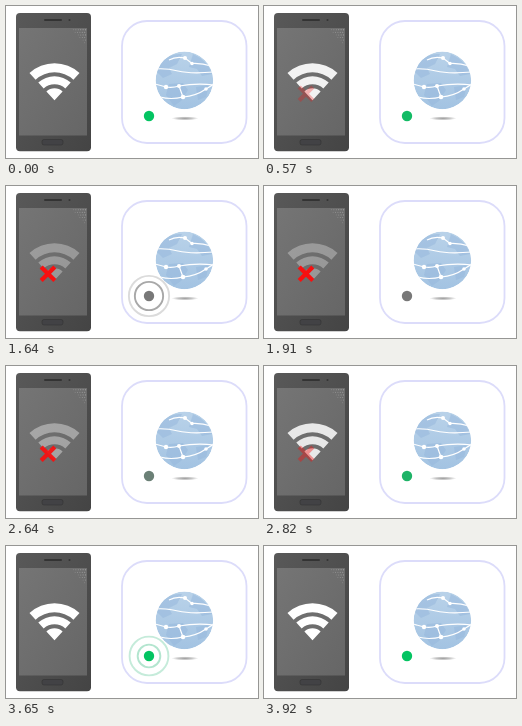
Write an HTML page that moves like this. It is 252 by 152 pixels and loops after 4520 ms.

```html
<!DOCTYPE html>
<html lang="en">
<head>
<meta charset="utf-8">
<title>Connection status</title>
<style>
html, body { margin: 0; width: 100%; height: 100%; overflow: hidden; background: #fff; }
svg { display: block; width: 100%; height: 100%; }
</style>
</head>
<body>
<svg viewBox="0 0 252 152">
  <defs>
    <linearGradient id="body" x2="1" y2="1">
      <stop offset="0" stop-color="#595959"/>
      <stop offset="1" stop-color="#444"/>
    </linearGradient>
    <linearGradient id="screen" x2="1" y2="1">
      <stop offset="0" stop-color="#757575"/>
      <stop offset="1" stop-color="#666"/>
    </linearGradient>
    <linearGradient id="sea" x2="0" y2="1">
      <stop offset="0" stop-color="#b9d2e9"/>
      <stop offset="1" stop-color="#a3c3e2"/>
    </linearGradient>
    <radialGradient id="shade">
      <stop offset="0" stop-color="#a0a0a0"/>
      <stop offset=".5" stop-color="#c4c4c4"/>
      <stop offset="1" stop-color="#fff"/>
    </radialGradient>
    <clipPath id="ball"><circle cx="178.4" cy="74.4" r="28.8"/></clipPath>
  </defs>

  <rect x="10" y="7" width="75" height="138.3" rx="4" fill="url(#body)"/>
  <rect x="13" y="22" width="68" height="107.5" fill="url(#screen)"/>
  <rect x="38" y="13" width="18" height="2" rx="1" fill="#333"/>
  <circle cx="63.5" cy="14" r="1" fill="#333"/>
  <rect x="36" y="133.5" width="21" height="5.5" rx="2" fill="#424245" stroke="#333" stroke-width=".6"/>
  <g id="dots" fill="#999"></g>
  <g id="wifi" fill="#fff"></g>
  <path id="cross" d="M35.2 80.9L48.8 94.5M48.8 80.9L35.2 94.5" fill="none" stroke="#f81010" stroke-width="4.3"/>

  <rect x="116" y="15" width="124.5" height="122" rx="25" fill="#fff" stroke="#dcdcfa" stroke-width="1.8"/>
  <ellipse cx="179" cy="112.4" rx="13.5" ry="2" fill="url(#shade)"/>
  <g clip-path="url(#ball)">
    <circle cx="178.4" cy="74.4" r="28.8" fill="url(#sea)"/>
    <g fill="#97b9dc" opacity=".55">
      <path d="M155 56Q164 47 176 48L171 58 163 62 166 68 157 72 151 66Z"/>
      <path d="M187 48Q201 54 206 68L196 70 191 63 183 61Z"/>
      <path d="M163 78L177 77 182 84 175 95 168 100 160 89Z"/>
      <path d="M190 81L203 79 200 91 192 94Z"/>
    </g>
    <g fill="none" stroke="#fff" stroke-width="1.2">
      <path d="M163 54Q170 50 179 52L186 57.5Q196 57 205 60"/>
      <path d="M149 63Q160 62 172 65T208 66"/>
      <path d="M149 78L160 81Q167 82 173 80L177 91Q190 90 200 83L208 78"/>
      <path d="M173 80Q190 77 208 79M154 91Q165 94 177 91"/>
    </g>
    <g fill="#fff">
      <circle cx="179" cy="52" r="2"/>
      <circle cx="186" cy="57.5" r="1.8"/>
      <circle cx="160" cy="81" r="2.2"/>
      <circle cx="173" cy="80" r="2"/>
      <circle cx="177" cy="91" r="2.3"/>
      <circle cx="200" cy="83" r="1.8"/>
    </g>
  </g>

  <g fill="none" stroke-width="1.9">
    <circle id="ring1" cx="143" cy="110"/>
    <circle id="ring2" cx="143" cy="110"/>
  </g>
  <circle id="dot" cx="143" cy="110" r="5.2"/>
</svg>
<script>
const LOOP = 4520, STEP = 30;
const GREEN = [4, 196, 98], GREY = [120, 120, 120];
const PULSES = [
  { start: 1260, end: 1910, color: '#979797' },
  { start: 3330, end: 3920, color: '#8fd9b8' }
];
const RING_LIFE = 410, RING_DELAY = 240;

const $ = id => document.getElementById(id);
const clamp = x => Math.min(1, Math.max(0, x));
const mix = (a, b, p) => `rgb(${a.map((v, i) => Math.round(v + (b[i] - v) * p))})`;
const set = (el, attrs) => {
  for (const k in attrs) el.setAttribute(k, attrs[k]);
};
const put = (parent, tag, attrs) => {
  const el = document.createElementNS('http://www.w3.org/2000/svg', tag);
  set(el, attrs);
  parent.append(el);
};

// Annular sector opening upwards from the foot of the signal sign.
function sector(r0, r1) {
  const x = 48.5, y = 94.3, a = 42.5 * Math.PI / 180;
  const s = Math.sin(a), c = Math.cos(a);
  return `M${x - r1 * s} ${y - r1 * c}A${r1} ${r1} 0 0 1 ${x + r1 * s} ${y - r1 * c}` +
    `L${x + r0 * s} ${y - r0 * c}A${r0} ${r0} 0 0 0 ${x - r0 * s} ${y - r0 * c}Z`;
}
[[0.1, 12], [16, 24], [28, 37]].forEach(([a, b]) => put($('wifi'), 'path', { d: sector(a, b) }));

// Halftone in the screen corner, thinning out to the lower left.
for (let i = 0; i < 6; i++)
  for (let j = 0; j < 6 - i; j++)
    put($('dots'), 'circle', { cx: 79.5 - i * 2.4 - (j % 2) * 0.8, cy: 23.7 + j * 2.6, r: 0.7 - (i + j) * 0.05 });

function drawRing(ring, age, color) {
  const p = clamp(age / RING_LIFE);
  set(ring, {
    r: 8 + 12.3 * (1 - (1 - p) ** 2),
    stroke: color,
    opacity: age > 0 ? Math.min(1, 0.3 + 3 * p) * Math.sqrt(1 - p) : 0
  });
}

function draw(time) {
  const t = Math.floor(time % LOOP / STEP + 1e-6) * STEP;
  const off = clamp((t - 540) / 240) - clamp((t - 2610) / 270);
  set($('wifi'), { opacity: 1 - 0.7 * off });
  set($('cross'), { opacity: off > 0 ? off ** 0.6 : 0 });
  set($('dot'), { fill: mix(GREEN, GREY, off) });

  const pulse = PULSES.find(p => time % LOOP >= p.start && time % LOOP < p.end);
  const age = pulse ? t - pulse.start : 0;
  const color = pulse ? pulse.color : 'none';
  drawRing($('ring1'), age, color);
  drawRing($('ring2'), age - RING_DELAY, color);
}

const begin = performance.now();
function tick() {
  draw(performance.now() - begin);
  requestAnimationFrame(tick);
}
tick();
</script>
</body>
</html>
```
